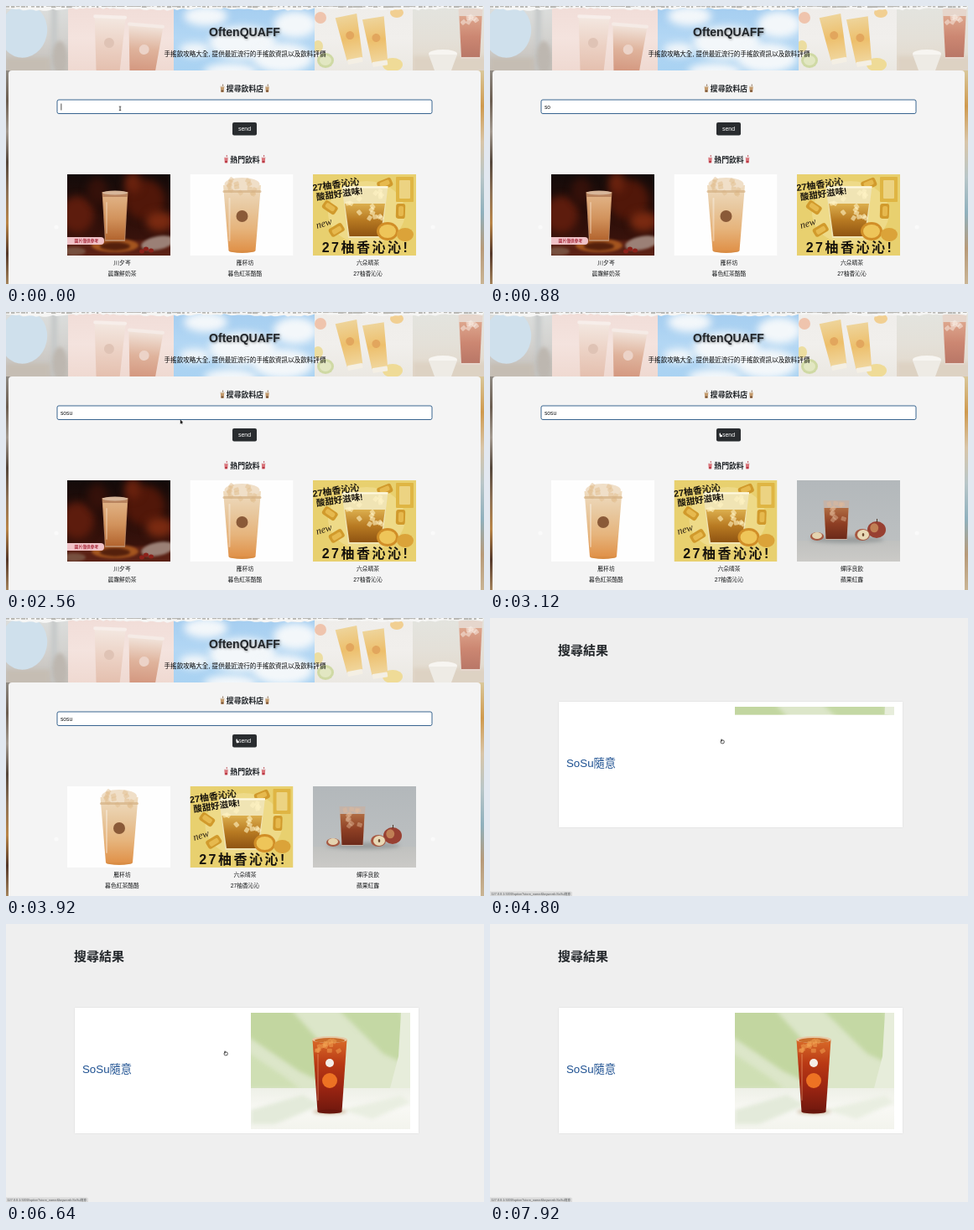
Animation of 570 by 332 pixels, one loop 8000 ms. Source, as an HTML page with a canvas:

```html
<!DOCTYPE html>
<html lang="zh-Hant">
<head>
<meta charset="utf-8">
<style>
html, body { margin: 0; width: 100%; height: 100%; overflow: hidden; background: #efefef; }
canvas { display: block; width: 570px; height: 332px; }
</style>
</head>
<body>
<canvas id="stage" width="570" height="332"></canvas>
<script>
const ctx = document.getElementById('stage').getContext('2d');
const LOOP = 8000, STEP = 80;
const FONT = '"Liberation Sans", "Noto Sans CJK TC", "Noto Sans CJK JP", "Noto Sans CJK", sans-serif';

const clamp = v => Math.max(0, Math.min(1, v));
const ease = v => v * v * (3 - 2 * v);
const lerp = (a, b, k) => a + (b - a) * k;

function seeded(seed) {
  return () => (seed = (seed * 16807) % 2147483647) / 2147483647;
}

function rect(x, y, w, h, fill, radius = 0, stroke) {
  ctx.beginPath();
  ctx.roundRect(x, y, w, h, radius);
  if (fill) { ctx.fillStyle = fill; ctx.fill(); }
  if (stroke) { ctx.strokeStyle = stroke; ctx.lineWidth = 1; ctx.stroke(); }
}

function oval(x, y, rx, ry, fill, turn = 0) {
  ctx.beginPath();
  ctx.ellipse(x, y, rx, ry, turn, 0, 7);
  ctx.fillStyle = fill;
  ctx.fill();
}

function poly(points, fill) {
  ctx.beginPath();
  points.forEach(([x, y]) => ctx.lineTo(x, y));
  ctx.closePath();
  ctx.fillStyle = fill;
  ctx.fill();
}

function shade(y0, y1, ...colors) {
  const g = ctx.createLinearGradient(0, y0, 0, y1);
  colors.forEach((c, i) => g.addColorStop(i / (colors.length - 1), c));
  return g;
}

function text(str, x, y, size, color, { weight = 400, align = 'center', spacing = 0 } = {}) {
  ctx.font = `${weight} ${size}px ${FONT}`;
  ctx.textAlign = align;
  ctx.letterSpacing = spacing + 'px';
  ctx.fillStyle = color;
  ctx.fillText(str, x, y);
  ctx.letterSpacing = '0px';
}

function placed(x, y, turn, draw) {
  ctx.save();
  ctx.translate(x, y);
  ctx.rotate(turn);
  draw();
  ctx.restore();
}

function clipped(x, y, w, h, draw) {
  ctx.save();
  ctx.beginPath();
  ctx.rect(x, y, w, h);
  ctx.clip();
  draw();
  ctx.restore();
}

function soft(radius, draw) {
  ctx.save();
  ctx.filter = `blur(${radius}px)`;
  draw();
  ctx.restore();
}

// Tapered tumbler centred on x.
function cup(x, top, bottom, wTop, wBottom, fill) {
  poly([[x - wTop / 2, top], [x + wTop / 2, top], [x + wBottom / 2, bottom], [x - wBottom / 2, bottom]], fill);
}

function iceCubes(seed, count, x, y, w, h, color) {
  const rnd = seeded(seed);
  for (let i = 0; i < count; i++) {
    placed(x + rnd() * w, y + rnd() * h, rnd() * 3, () => rect(-3, -3, 6, 5, color, 1));
  }
}

// ---- header collage ----
function header() {
  clipped(0, 0, 74, 77, () => {
    rect(0, 0, 74, 77, shade(0, 77, '#dcdedd', '#d3d2cf', '#c3beb8'));
    soft(2, () => {
      rect(54, 0, 7, 77, '#c6c9c9');
      oval(64, 62, 9, 20, '#bdb7b0');
      rect(0, 62, 52, 20, '#c5bdb3');
    });
    oval(21, 30, 28, 32, '#cfe0ec', 0.2);
  });

  clipped(74, 0, 126, 77, () => {
    rect(74, 0, 126, 77, shade(0, 77, '#f1ddd8', '#f4e3de', '#efd9d1'));
    placed(123, 42, 0.04, () => {
      cup(0, -28, 36, 37, 28, shade(-28, 36, '#f3e7e0', '#ecd2c5', '#e4bfae'));
      rect(-20, -31, 40, 4, '#f7eeea', 2);
      oval(0, 2, 6, 6, '#dfc3b5');
    });
    placed(165, 48, 0.08, () => {
      cup(0, -24, 32, 41, 30, shade(-24, 32, '#f1e3da', '#dfb39c', '#d3967e'));
      rect(-22, -27, 44, 4, '#f5ebe6', 2);
      oval(0, 4, 6, 6, '#ecd3c8');
    });
  });

  clipped(200, 0, 168, 77, () => {
    rect(200, 0, 168, 77, shade(0, 77, '#a4cdf0', '#b3d7f4', '#a9d2f2'));
    soft(5, () => [[238, 12, 26, 12], [282, 44, 40, 20], [330, 62, 36, 18], [345, 22, 26, 16], [225, 52, 18, 8], [268, 78, 32, 10]]
      .forEach(([x, y, rx, ry]) => oval(x, y, rx, ry, '#f3f7fa')));
  });

  clipped(368, 0, 117, 77, () => {
    rect(368, 0, 117, 77, shade(0, 77, '#efedea', '#f1efec', '#ebe8e2'));
    oval(375, 14, 7, 7, '#efc4ad');
    oval(466, 8, 8, 6, '#f1cf92');
    oval(381, 65, 10, 9, '#cfd9a4');
    oval(381, 65, 7, 6, '#e2e7c2');
    oval(372, 48, 6, 7, '#ecdda0');
    oval(461, 70, 12, 8, '#efdb97');
    [[411, 39, -0.2], [442, 42, -0.15]].forEach(([x, y, turn]) => placed(x, y, turn, () => {
      cup(0, -28, 25, 26, 19, shade(-28, 25, '#eed49a', '#edbf6c', '#f0d69d'));
      rect(-9, 24, 18, 6, '#f4efe4', 1);
      oval(0, -4, 5, 5, '#e2a65d');
    }));
  });

  clipped(485, 0, 85, 77, () => {
    rect(485, 0, 85, 77, shade(0, 77, '#e3e4df', '#e4e0d8', '#e2d8ca'));
    soft(2, () => rect(485, 60, 90, 20, '#ddd2c3'));
    oval(521, 57, 17, 5, '#f7f5f1');
    cup(521, 58, 77, 34, 20, '#eeebe5');
    cup(554, 3, 63, 29, 23, '#e6d6cc');
    cup(554, 12, 61, 27, 22, shade(12, 61, '#dda68d', '#cc8772', '#b97767'));
    iceCubes(500, 7, 545, 9, 18, 13, 'rgba(250,240,232,.5)');
  });
  tornEdge();
}

function tornEdge() {
  const rnd = seeded(77);
  const edge = [];
  for (let x = 0; x <= 570; x += 4) edge.push([x, 2.8 + rnd() * 2 + Math.sin(x / 23)]);
  poly([[0, 0], ...edge, [570, 0]], '#f6f6f5');
  for (let x = 0; x < 570; x += 6) rect(x, 0, 2 + rnd() * 5, 0.6 + rnd() * 1.6, '#b9b8b4');
}

// ---- carousel pictures, drawn in a 123 x 97 box ----
function milkTea() {
  rect(0, 0, 123, 97, shade(0, 97, '#140b0a', '#2a0e09', '#42150d'));
  soft(5, () => {
    oval(12, 48, 20, 22, '#5d1c0d');
    oval(92, 30, 24, 24, '#511709');
    oval(110, 56, 16, 12, '#7a2a11');
    oval(36, 20, 12, 16, '#35110a');
    oval(78, 10, 10, 12, '#6a220e');
  });
  soft(1.5, () => {
    rect(0, 79, 123, 20, '#5b2115');
    oval(108, 82, 20, 8, '#9b8076', -0.2);
    oval(8, 92, 14, 5, '#77503f');
    oval(57, 85, 28, 8, '#a4551f');
    oval(57, 86, 18, 5, '#54200c');
  });
  cup(57, 21, 80, 31, 24, '#b9845f');
  cup(57, 27, 78, 29, 22, shade(27, 78, '#e0b183', '#d2935d', '#b3652f'));
  oval(57, 22, 15, 2.5, '#d7b69a');
  rect(46, 33, 2, 38, 'rgba(255,238,220,.35)', 1);
  [[94, 89], [100, 91], [89, 92]].forEach(([x, y]) => oval(x, y, 3, 2.5, '#8c211a'));
  rect(0, 75, 44, 9, '#f0c3c8', [0, 4, 4, 0]);
  text('圖片僅供參考', 23, 81.3, 4.8, '#a8283a', { weight: 700 });
}

function orangeTea() {
  rect(0, 0, 123, 97, '#fefefe');
  oval(62, 91, 16, 3, '#d98d45');
  cup(62, 13, 91, 45, 32, shade(13, 91, '#efdcc0', '#e8c89f', '#e6b47c', '#e0924a'));
  oval(62, 12, 21, 8, '#f0dfc8');
  iceCubes(19, 14, 46, 6, 32, 18, 'rgba(226,190,142,.5)');
  rect(39, 19, 46, 3, 'rgba(214,178,135,.7)', 2);
  oval(62, 50, 7, 7, '#8a5a38');
  rect(46, 28, 2, 52, 'rgba(255,255,255,.35)', 1);
}

function yellowTea() {
  rect(0, 0, 123, 97, '#e8d06f');
  oval(64, 46, 46, 38, '#eeda88');
  [[86, 12], [20, 40], [104, 44], [28, 66]].forEach(([x, y], i) =>
    placed(x, y, i - 0.4, () => { rect(-9, -6, 18, 11, '#d19a2c', 3); rect(-6, -4, 12, 6, '#e6b94e', 2); }));
  rect(99, 3, 21, 30, '#dfb543', 1);
  rect(103, 7, 13, 22, '#ecd382', 1);
  cup(62, 14, 76, 55, 40, '#f0e4b4');
  cup(62, 35, 74, 48, 37, shade(35, 74, '#dcaf4e', '#b87a22', '#8f5412'));
  iceCubes(41, 16, 42, 20, 40, 36, 'rgba(255,243,196,.6)');
  ctx.strokeStyle = '#fff9df';
  ctx.lineWidth = 1;
  ctx.strokeRect(35, 15, 54, 1);
  oval(89, 68, 13, 11, '#d18e27');
  oval(89, 68, 10, 8, '#eec559');
  oval(110, 72, 10, 8, '#dba339');
  placed(0, 20, -0.14, () => {
    text('27柚香沁沁', 0, 0, 11, '#17130d', { weight: 900, align: 'left' });
    text('酸甜好滋味!', 3, 11.5, 10.5, '#17130d', { weight: 900, align: 'left' });
  });
  placed(5, 65, -0.3, () => {
    ctx.font = 'italic 400 12px "Liberation Serif", serif';
    ctx.textAlign = 'left';
    ctx.fillStyle = '#2c2115';
    ctx.fillText('new', 0, 0);
  });
  text('27柚香沁沁!', 63, 93, 16, '#17130d', { weight: 900, spacing: 2.5 });
}

function apple(x, y, r) {
  oval(x, y, r, r * 0.9, '#984032');
  oval(x - r * 0.25, y - r * 0.2, r * 0.45, r * 0.5, '#c08055');
  rect(x, y - r - 2, 1, 4, '#4c3727');
}

function appleTea() {
  rect(0, 0, 123, 97, shade(0, 97, '#b3b8bb', '#b9bdbf', '#bfc2c2'));
  rect(0, 72, 123, 25, shade(72, 97, '#c0c1bf', '#cbcac7'));
  soft(2, () => oval(60, 71, 44, 4, '#999d9d'));
  cup(47, 24, 71, 31, 26, '#c3b3a9');
  cup(47, 33, 70, 29, 25, shade(33, 70, '#b06d43', '#8e3f24', '#6c2a1a'));
  iceCubes(31, 11, 38, 27, 18, 22, 'rgba(226,186,152,.45)');
  apple(95, 59, 11);
  oval(78, 65, 9, 7, '#a65741');
  oval(79, 65, 7, 6, '#e8d9b6');
  oval(79, 65, 1.3, 2, '#6d4930');
  oval(24, 67, 8, 5, '#a65741');
  oval(24, 66, 6, 4, '#e4d3b0');
}

const slides = [
  ['川夕岑', '晨霧鮮奶茶', milkTea],
  ['雁杯坊', '暮色紅茶酪酪', orangeTea],
  ['六朵晴茶', '27柚香沁沁', yellowTea],
  ['蟬序良飲', '蘋果紅露', appleTea]
];

function carousel(t) {
  const gap = 146.5;
  const shift = gap * ease(clamp((t - 2600) / 480));
  clipped(61, 198, 440, 134, () => slides.forEach(([shop, drink, picture], i) => {
    const x = 73 + i * gap - shift;
    if (x > 510 || x < -130) return;
    placed(x, 201, 0, () => clipped(0, 0, 123, 97, picture));
    text(shop, x + 65.5, 308.5, 6.8, '#151719');
    text(drink, x + 65.5, 322, 6.8, '#151719');
  }));
  oval(60, 264, 2.5, 2.5, '#fafafa');
  oval(509, 264, 2.5, 2.5, '#fafafa');
}

// Small drink icon: straw, cup, lid and filling.
function drinkIcon(x, y, body, lid, detail) {
  rect(x + 0.3, y - 0.5, 0.8, 3, detail);
  cup(x, y + 2, y + 9, 4.6, 3.2, body);
  rect(x - 2.5, y + 1.6, 5, 1.2, lid, 0.5);
  rect(x - 1.4, y + 6.6, 2.8, 1.8, detail);
}

const bubbleTea = x => drinkIcon(x, 94, '#c39a6c', '#e0d3c2', '#6f4d36');
const sodaCup = x => drinkIcon(x, 178.5, '#d9737a', '#ece2e2', '#b5333f');

function searchPage(t) {
  rect(0, 77, 285, 255, shade(77, 332, '#8f8a83', '#6b5d50', '#a39a90', '#54463b', '#8d7155', '#b98547', '#54382a', '#a5845c'));
  rect(285, 77, 285, 255, shade(77, 332, '#d9c79a', '#cf9a4e', '#d8c5a8', '#b8c6c8', '#8fb0bd', '#b79a78', '#c9b494'));
  header();
  rect(3, 77, 563, 260, '#f4f4f4', 4);

  ctx.save();
  ctx.shadowColor = 'rgba(40,40,40,.5)';
  ctx.shadowBlur = 3;
  ctx.shadowOffsetX = ctx.shadowOffsetY = 1;
  text('OftenQUAFF', 284.5, 35.5, 14, '#212529', { weight: 700 });
  ctx.restore();
  text('手搖飲攻略大全, 提供最近流行的手搖飲資訊以及飲料評價', 285, 59.5, 7.55, '#050505');

  bubbleTea(258);
  text('搜尋飲料店', 285, 102, 8.9, '#212529', { weight: 600 });
  bubbleTea(311.5);
  rect(61, 112, 447, 16.5, '#fff', 2, '#38648f');
  const typed = 'sosu'.slice(0, Math.max(0, Math.floor((t - 480) / 160)));
  text(typed, 65, 122.7, 6.7, '#151719', { align: 'left' });
  if (t < 640) rect(65.5, 116.5, 0.8, 8, '#222');
  rect(270, 139, 29, 15.5, '#292c2f', 2);
  text('send', 284.5, 149, 7, '#fff');

  sodaCup(262.5);
  text('熱門飲料', 285, 186.5, 8.9, '#212529', { weight: 600 });
  sodaCup(307);
  carousel(t);
}

// ---- results ----
function resultPhoto() {
  rect(292, 106, 190, 139, '#dce6c9');
  soft(2.5, () => {
    poly([[285, 98], [336, 98], [392, 160], [392, 196], [350, 176], [285, 132]], '#c2d6a0');
    poly([[392, 98], [468, 98], [482, 132], [482, 170], [450, 155]], '#c4d8a4');
    poly([[285, 151], [330, 181], [350, 196], [285, 196]], '#cfdfb4');
  });
  poly([[471, 106], [482, 106], [482, 196], [458, 196], [468, 158]], '#e7eddb');
  rect(292, 196, 190, 49, shade(196, 245, '#eef0e7', '#f8f8f4', '#f3f4ed'));
  soft(2, () => {
    poly([[292, 222], [354, 204], [376, 216], [321, 239], [292, 239]], '#e3eada');
    poly([[400, 222], [471, 205], [482, 213], [437, 233]], '#e9eee1');
    oval(386, 224, 20, 3, '#c9b89d');
  });
  cup(386, 138, 224, 41, 29, shade(138, 224, '#d96b29', '#b93914', '#9b2512', '#70180e'));
  oval(386, 224, 14.5, 2.5, '#68170d');
  oval(386, 138, 21, 4, '#e6c9a6');
  oval(386, 139, 18, 3, '#cb6d2b');
  iceCubes(53, 12, 371, 140, 30, 12, 'rgba(244,166,84,.5)');
  rect(371, 155, 2, 56, 'rgba(255,192,140,.25)', 1);
  oval(386, 166, 5, 5, '#f4eee8');
  oval(386, 187, 9, 9, '#ed7223');
}

function resultPage(t) {
  rect(0, 0, 570, 332, '#efefef');
  text('搜尋結果', 81, 43.5, 15, '#212529', { weight: 700, align: 'left' });
  rect(81.5, 99.5, 411, 151, '#fff', 1, '#e6e6e6');
  text('SoSu隨意', 91, 178, 13.3, '#1d5091', { weight: 500, align: 'left' });
  const loaded = t >= 5520 ? 139 : t >= 4720 ? 9.5 : 0;
  clipped(292, 106, 190, loaded, resultPhoto);
  if (t >= 4560) {
    rect(0, 326.5, 98, 6, '#dadada', [0, 2, 0, 0]);
    text('127.0.0.1:5000/option?store_name&keyword=SoSu隨意', 1.5, 331, 3.8, '#55585b', { align: 'left' });
  }
}

// ---- mouse ----
// Keys: time, x, y
const path = [[2160, 136, 122], [2560, 209, 131], [2960, 275, 147], [4800, 277, 147], [6000, 277, 147], [6560, 262, 154]];

function mouseAt(t) {
  const i = path.findIndex(([at]) => at > t);
  if (i === 0) return path[0].slice(1);
  if (i < 0) return path[path.length - 1].slice(1);
  const [t0, x0, y0] = path[i - 1], [t1, x1, y1] = path[i];
  const k = (t - t0) / (t1 - t0);
  return [lerp(x0, x1, k), lerp(y0, y1, k)];
}

function mouse(t) {
  if ((t >= 640 && t < 2160) || t >= 7360) return;
  const [x, y] = mouseAt(t);
  if (t < 2320) {
    rect(x - 0.4, y - 2, 0.9, 5, '#333');
    rect(x - 1.3, y - 2.3, 2.6, 0.7, '#333');
    rect(x - 1.3, y + 2.4, 2.6, 0.7, '#333');
  } else if (t < 2880) {
    poly([[x - 1.2, y - 2.5], [x - 1.2, y + 2.8], [x, y + 1.7], [x + 1, y + 3], [x + 1.6, y + 2.5], [x + 0.8, y + 1.2], [x + 2.3, y + 1]], '#222');
  } else {
    const ink = t < 4240 ? '#17191b' : '#454545';
    rect(x - 1.8, y - 1, 4, 3.8, '#fff', 1.4, ink);
    rect(x - 1.6, y - 2.6, 1.4, 3.2, t < 4240 ? '#fff' : ink, 0.6);
  }
}

function frame(now) {
  const t = Math.floor((now % LOOP) / STEP) * STEP;
  ctx.clearRect(0, 0, 570, 332);
  (t < 4240 ? searchPage : resultPage)(t);
  mouse(t);
  requestAnimationFrame(frame);
}
frame(performance.now());
</script>
</body>
</html>
```
